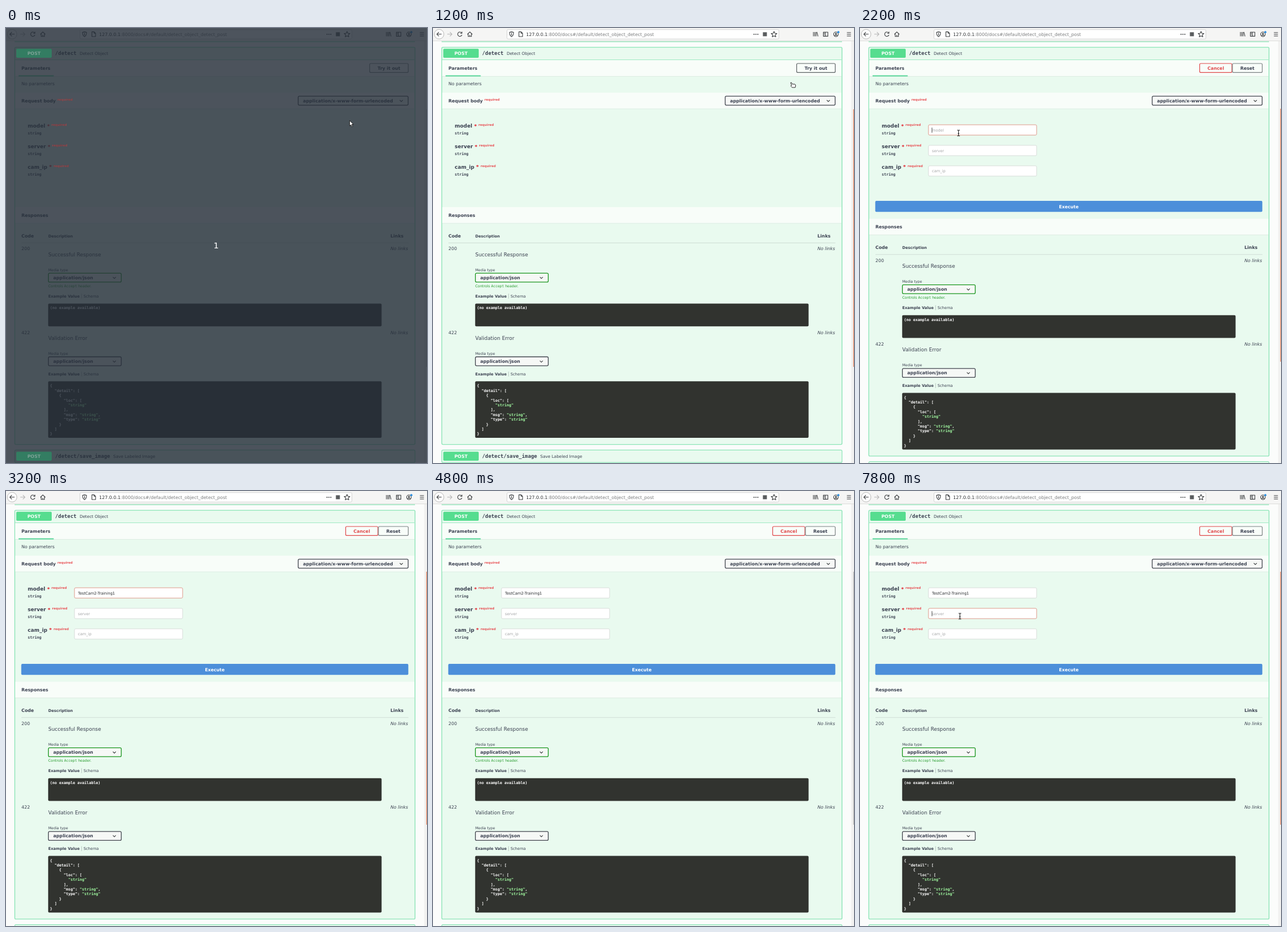
These frames come from a looping animation (737x760 px, 8 s). An HTML page:

```html
<!DOCTYPE html>
<html lang="en">
<head>
<meta charset="utf-8">
<title>API docs</title>
<style>
  html, body { margin: 0; width: 100%; height: 100%; overflow: hidden; background: #fbfcfb; }
  svg { display: block; width: 737px; height: 760px; }
  text { font-family: "DejaVu Sans", sans-serif; fill: #3b4151; white-space: pre; }
  .mono { font-family: "DejaVu Sans Mono", monospace; }
  .b { font-weight: bold; }
  .i { font-style: italic; }
  .mid { text-anchor: middle; }
  .line { fill: none; stroke: #3c3f41; stroke-width: 1.1; stroke-linejoin: round; }
</style>
</head>
<body>
<svg id="stage" viewBox="0 0 737 760" xmlns="http://www.w3.org/2000/svg"></svg>
<script>
// Font sizes follow the page zoom
const Z = 0.556, S10 = 10 * Z, S11 = 11.2 * Z, S12 = 12 * Z, S13 = 13 * Z, S14 = 14 * Z, S16 = 16 * Z;
const INK = '#3b4151', GREEN = '#56dd8f', EDGE = '#8de5b8', MINT = '#e9faef', STRIP = '#f8fdf9';
const SHIFT = 20.3;

const rect = (x, y, w, h, fill, more = '') =>
  `<rect x="${x}" y="${y}" width="${w}" height="${h}" fill="${fill}" ${more}/>`;
const box = (x, y, w, h, fill, stroke, sw = 1.1, more = '') =>
  rect(x, y, w, h, fill, `rx="2" stroke="${stroke}" stroke-width="${sw}" ${more}`);
const text = (x, y, size, str, cls = '', fill = INK) =>
  `<text x="${x}" y="${y}" font-size="${size}" class="${cls}" style="fill:${fill}">${str}</text>`;
const path = (d, more = '') => `<path class="line" d="${d}" ${more}/>`;
const group = (id, body, more = '') => `<g id="${id}" ${more}>${body}</g>`;

const required = (x, y, fill = '#e8565a') => text(x, y, S10, 'required', 'b', fill);
const chevron = (x, y) => path(`M${x - 2.6} ${y - 1.2}l2.6 2.6l2.6 -2.6`, 'stroke-width="1.2"');

function select(x, y, w, label, stroke) {
  return box(x, y, w, 15.6, '#f6f8f6', stroke, 1.3) +
    text(x + 8.5, y + 10.7, S14, label, 'b') + chevron(x + w - 12, y + 8);
}

function post(y, route, title) {
  return rect(18, y + 3.3, 62, 15.6, GREEN, 'rx="1.7"') +
    text(49, y + 13.9, S14, 'POST', 'b mid', '#fff') +
    text(86, y + 14.1, S16, route, 'mono b') +
    text(86 + route.length * 0.602 * S16 + 5.4, y + 13.7, S13, title);
}

function toolbar() {
  const dot = x => `<circle cx="${x}" cy="11" r="1" fill="#3c3f41"/>`;
  return rect(0, 0, 737, 22.5, '#f5f5f4') + rect(0, 22, 737, 0.7, '#d2d2d0') +
    '<circle cx="10.7" cy="10.8" r="8.4" fill="#fdfdfd" stroke="#a9a9a8" stroke-width=".8"/>' +
    path('M15 10.8H6.8M10.3 7.2L6.7 10.8L10.3 14.4', 'stroke-width="1.3"') +
    path('M25 10.8H33M29.6 7.2L33.2 10.8L29.6 14.4', 'style="stroke:#b4b4b4"') +
    path('M50 8.5A3.8 3.8 0 1 0 50.6 12M50.7 6.4V9.3H47.6') +
    path('M60.2 11L64.5 6.8L68.8 11M61.6 10.3V14.8H67.4V10.3M64.5 14.6V12') +
    box(129.5, 2.8, 476, 16.4, '#fff', '#cbcbca', 0.8) +
    path('M137.5 6.6L141 7.6C141 11.5 140 13.8 137.5 15.2C135 13.8 134 11.5 134 7.6ZM137.5 8.6V13') +
    path('M150.4 6.6H154.2L156.8 9.2V15H150.4ZM154.2 6.6V9.2H156.8', 'stroke-width=".9"') +
    `<text x="163" y="13.8" font-size="7.87" style="fill:#303335">127.0.0.1<tspan fill="#7b7d7e">:8000/docs#/default/detect_object_detect_post</tspan></text>` +
    dot(562) + dot(565.3) + dot(568.6) +
    rect(577.5, 7.4, 7, 7, '#5a5d5f') +
    path('M597 6L598.5 9.2L602 9.6L599.4 12L600.1 15.5L597 13.8L593.9 15.5L594.6 12L592 9.6L595.5 9.2Z') +
    path('M666 7V14.6M668.4 7V14.6M670.6 7V14.6M672 7L674 14.6') +
    path('M683.4 7.2H691.2V14.4H683.4ZM686.6 7.2V14.4M684.4 9H685.6M684.4 10.8H685.6') +
    '<circle class="line" cx="705.4" cy="11" r="4"/><circle cx="705.4" cy="10" r="1.5" fill="#3c3f41"/>' +
    path('M703 13.5Q705.4 11.3 707.8 13.5') + '<circle cx="709.6" cy="7.2" r="1.9" fill="#2d8fe0"/>' +
    path('M724.6 8H731.6M724.6 11H731.6M724.6 14H731.6');
}

function field(name, y) {
  const w = { model: 31, server: 32, cam_ip: 34.6 }[name];
  return text(38, y + 3.3, S16, name, 'b') + text(38 + w + 2.9, y + 3.8, S16, '*', 'b', '#e0202a') +
    required(38 + w + 10.6, y + 0.4) + text(38, y + 15.2, S12, 'string', 'mono b');
}

function input(name, y) {
  return box(119.9, y, 189.3, 18, '#fff', '#d5dad6', 0.9, `id="in_${name}"`) +
    `<text id="ph_${name}" x="126" y="${y + 11.5}" font-size="${S12}" style="fill:#a3a5a6">${name}</text>`;
}

function response(y, code, title, stroke) {
  return text(27, y + 2.8, S14, code) + text(673, y + 2.8, S14, 'No links', 'i') +
    text(74, y + 13, S16, title) + text(74, y + 39.2, S11, 'Media type') +
    select(74.3, y + 42.7, 127.4, 'application/json', stroke);
}

const tabs = y => text(74, y, S12, 'Example Value', 'b') +
  rect(131.9, y - 6.5, 0.6, 8.5, '#9aa3a3') + text(135.7, y, S12, 'Schema');

function json(y) {
  const lines = ['{', '  "detail": [', '    {', '      "loc": [', '        "string"', '      ],',
    '      "msg": "string",', '      "type": "string"', '    }', '  ]', '}'];
  return lines.map((s, i) => text(77, (y + i * 8.4).toFixed(1), S12,
    s.replace('"string"', '<tspan fill="#a2fca2">"string"</tspan>'), 'mono b', '#fff')).join('');
}

function lower() {
  return rect(16, 313, 699, 28, STRIP) + rect(16, 340.8, 699, 0.6, '#d3e3d9') +
    text(27, 329.6, S14, 'Responses', 'b') +
    text(27, 366.2, S14, 'Code', 'b') + text(74, 366, S12, 'Description', 'b') +
    text(673, 366.2, S14, 'Links', 'b') + rect(27, 375.2, 677.5, 0.7, '#c3d2cb') +
    response(385.6, '200', 'Successful Response', '#1a961e') +
    text(74, 452.6, S11, 'Controls <tspan class="mono">Accept</tspan> header.', '', '#269a2c') +
    tabs(470.6) + rect(73.8, 481.4, 583.7, 39.8, '#31332f', 'rx="2"') +
    text(77, 491.3, S12, '(no example available)', 'mono b', '#fff') +
    response(531.8, '422', 'Validation Error', '#41444e') + tabs(606.8) +
    rect(73.8, 617.3, 583.7, 98.8, '#31332f', 'rx="2"') + json(627.4) +
    box(15.4, 737.4, 700.6, 21.8, MINT, EDGE, 1.2) + post(737, '/detect/save_image', 'Save Labeled Image');
}

function button(x, w, label, id, stroke, fill = INK) {
  return box(x, 62, w, 15.7, 'none', stroke, 1.2, `id="${id}"`) +
    text(x + w / 2, 72.8, S14, label, 'b mid', fill);
}

const arrow = group('arrow', '<path d="M0 0V9.2L2.2 7.3L3.7 10.8L5.3 10.1L3.8 6.7H6.6Z" fill="#fff" stroke="#111" stroke-width=".9" stroke-linejoin="round"/>');
const beam = group('beam', '<path d="M-2.3 -5H-.7L0 -4.5L.7 -5H2.3M0 -4.5V4.5M-2.3 5H-.7L0 4.5L.7 5H2.3M-1.3 1H1.3" fill="none" stroke="#222" stroke-width="1.1"/>');
const hand = group('hand', '<path d="M-4.4 -4.2Q-3.2 -5.2 -2.2 -3.4L-1.4 -1.6H2.6Q4.6 -1.2 4.3 1.4L3.6 4.2H-1.8L-4.1 1.7Q-4.3 .5 -2.7 .6Z" fill="#fff" stroke="#111" stroke-width=".9" stroke-linejoin="round"/>');

const glow = [36.3, 740.3].map(y => rect(18, y, 62, 15.6, '#337d62', 'rx="1.7"') +
  text(49, y + 10.6, S14, 'POST', 'b mid', '#7fa398')).join('') +
  required(90, 126.6, '#94494d') + required(79.6, 171.4, '#94494d') +
  required(80.6, 207.2, '#94494d') + required(83.2, 243, '#94494d');

document.getElementById('stage').innerHTML =
  rect(0, 0, 737, 760, '#fbfcfb') +
  rect(15, 22, 701, 2.2, MINT) + rect(15, 23.4, 701, 1.2, EDGE) + toolbar() +
  rect(732, 23, 5, 737, '#f1f1f0') + rect(735.7, 142, 1.3, 450, '#bbb', 'id="thumb"') +
  box(15.4, 33.6, 700.6, 694, MINT, EDGE, 1.4, 'id="block"') +
  post(33, '/detect', 'Detect Object') +
  rect(16, 55.2, 699, 0.8, EDGE) + rect(16, 56, 699, 28.6, STRIP) + rect(16, 84.4, 699, 0.6, '#d3e3d9') +
  rect(22, 82.6, 61.5, 2, '#5bd79b') + text(27, 72.8, S14, 'Parameters', 'b') +
  text(27, 99.7, S14, 'No parameters') +
  rect(16, 113, 699, 28, STRIP) + rect(16, 140.8, 699, 0.6, '#d3e3d9') +
  text(27, 129.8, S14, 'Request body', 'b') + required(90, 126.6) +
  select(511.5, 119.2, 192.5, 'application/x-www-form-urlencoded', '#41444e') +
  field('model', 171) + field('server', 206.8) + field('cam_ip', 242.6) +
  group('idle', button(636.6, 67.6, 'Try it out', 'try', '#7b8183')) +
  group('edit',
    group('cancel', box(594.6, 62, 56.4, 15.7, 'none', 'currentColor', 1.2) +
      text(622.8, 72.8, S14, 'Cancel', 'b mid', 'currentColor')) +
    button(652, 52.2, 'Reset', 'reset', '#7b8183') +
    input('model', 169.1) + input('server', 205) + input('cam_ip', 240.8) +
    group('typed', text(126, 180.6, S12, 'TestCam2-Training1', '', '#26292c')) +
    rect(0, 0, 0.8, 9, '#222', 'id="caret"') +
    rect(26.7, 302, 677.6, 19.3, '#4c8fda', 'rx="2"') +
    text(365.5, 314.5, S14, 'Execute', 'b mid', '#fff')) +
  group('lower', lower()) +
  group('dim', rect(0, 0, 737, 760, 'rgba(39,47,58,.82)') + glow +
    text(368, 385.4, 14.6, '1', 'mid', '#fff')) +
  arrow + beam + hand;

const LOOP = 8000;
// time, pointer shape, x, y
const pointer = [
  [0, 'arrow', 601.6, 161.8], [100, 'arrow', 641.4, 138.2], [200, 'arrow', 660.5, 112.8],
  [400, 'arrow', 660, 103], [500, 'arrow', 658.5, 92], [600, 'arrow', 657, 82], [700, 'hand', 658, 75.5],
  [1200, 'hand', 630.5, 99.7], [1300, 'arrow', 279.4, 217.6], [1400, 'arrow', 230, 214],
  [1500, 'arrow', 196, 208], [1600, 'beam', 178, 203], [1800, 'beam', 173, 184],
  [2200, 'beam', 172.5, 183.5], [2800, '', 0, 0],
  [6900, 'arrow', 96.8, 215.6], [7000, 'beam', 140, 229.5], [7200, 'beam', 182, 222.5],
  [7400, 'beam', 176.3, 221.4], [7800, 'beam', 174.9, 218.7]
];
// time, caret x, caret y; x = 0 hides it
const carets = [[0, 0, 0], [1900, 125.6, 174], [2800, 191.2, 174], [3200, 0, 0], [4400, 191.2, 174],
  [4800, 0, 0], [7600, 125.6, 209.8]];

const $ = id => document.getElementById(id);
const show = (id, on) => { $(id).style.display = on ? '' : 'none'; };
const at = (steps, t) => steps.reduce((a, s) => s[0] <= t ? s : a);

function focus(name, on) {
  $('in_' + name).setAttribute('stroke', on ? '#dc8f80' : '#d5dad6');
}

function draw(t) {
  const open = t >= 1300;
  show('dim', t < 100);
  show('idle', !open);
  show('edit', open);
  $('lower').setAttribute('transform', `translate(0 ${open ? SHIFT : 0})`);
  $('block').setAttribute('height', open ? 694 + SHIFT : 694);
  $('try').setAttribute('stroke', t >= 700 ? '#5c6264' : '#7b8183');
  $('cancel').style.color = t < 1400 ? '#bd4347' : '#e0484a';

  const thumb = $('thumb'), active = t >= 1200 && t < 4800 || t >= 7500;
  thumb.setAttribute('fill', active ? '#e58a68' : '#b9b9b8');
  thumb.setAttribute('y', open ? 141 : 142);
  thumb.setAttribute('height', open ? 442 : 450);

  focus('model', t >= 1800 && t < 4800);
  focus('server', t >= 7400);
  show('ph_model', t < 2800);
  show('typed', t >= 2800);

  const [, cx, cy] = at(carets, t);
  show('caret', cx);
  $('caret').setAttribute('x', cx);
  $('caret').setAttribute('y', cy);

  const [, shape, x, y] = at(pointer, t);
  for (const id of ['arrow', 'beam', 'hand']) {
    show(id, id === shape);
    $(id).setAttribute('transform', `translate(${x} ${y})`);
  }
}

const start = performance.now();
function tick() {
  draw((performance.now() - start) % LOOP);
  requestAnimationFrame(tick);
}
tick();
</script>
</body>
</html>
```
